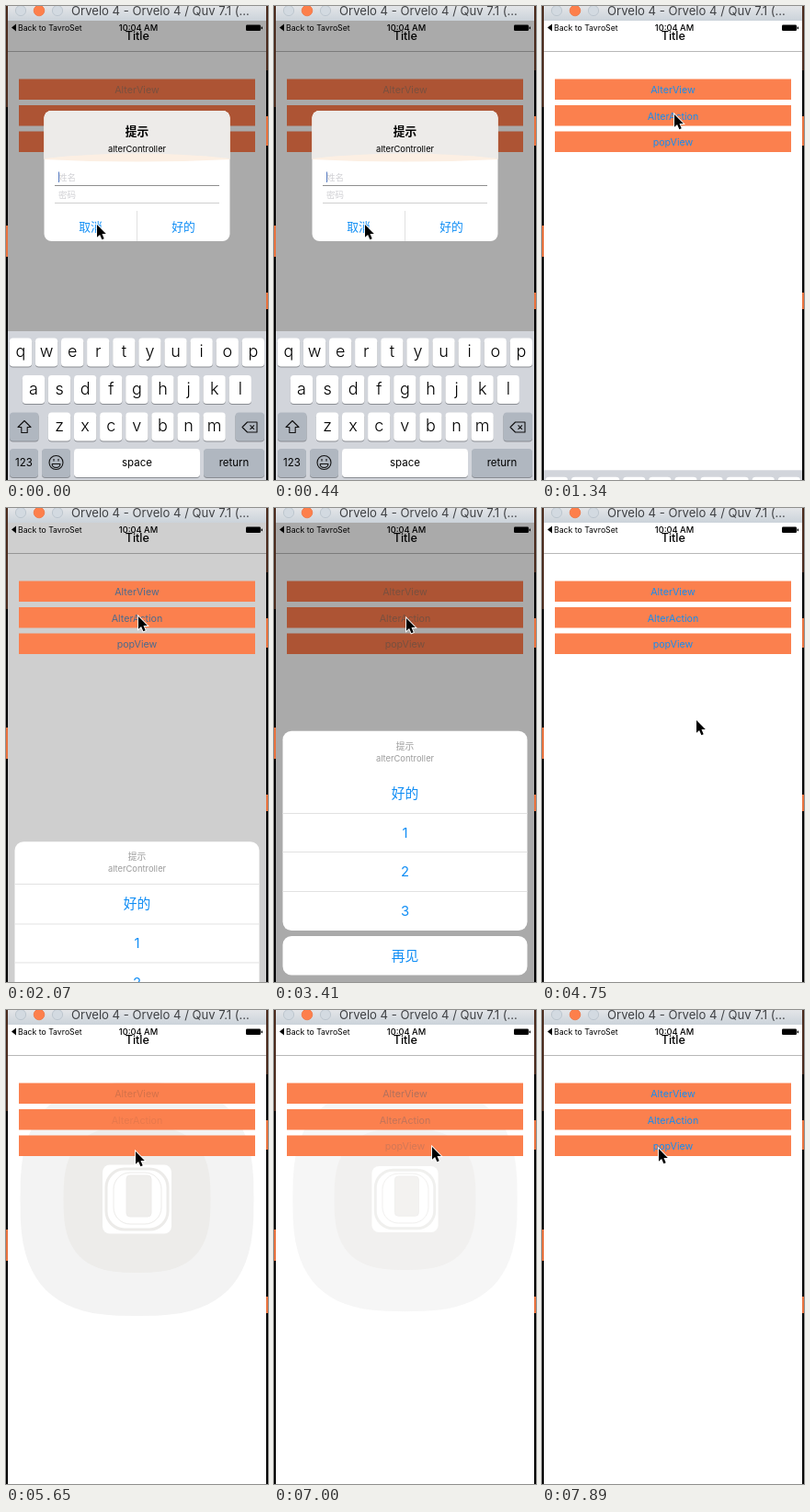
Animation, 285 px wide and 516 px high, one loop 8 s. Source, as an HTML page:

```html
<!DOCTYPE html>
<html lang="en">
<head>
<meta charset="utf-8">
<style>
  html, body { margin: 0; width: 100%; height: 100%; overflow: hidden; background: #000; }
  svg { display: block; width: 285px; height: 516px; }
  text { font-family: Inter, "Noto Sans CJK SC", "Noto Sans CJK", sans-serif; text-anchor: middle; }
  .start { text-anchor: start; }
  .blue { fill: #0f8df5; }
  .hint { fill: #cfcfd3; font-size: 9.5px; }
  .medium { font-weight: 500; }
  .bold { font-weight: 600; }
</style>
</head>
<body>
<svg viewBox="0 0 285 516">
  <defs>
    <linearGradient id="bar" x2="0" y2="1">
      <stop stop-color="#e3e5e8"/><stop offset="1" stop-color="#cbd3da"/>
    </linearGradient>
    <clipPath id="card"><rect x="41.5" y="114" width="202" height="142" rx="8"/></clipPath>
  </defs>

  <!-- desktop edges and window bar -->
  <path d="M0 0h2v110h-2zM283 0h2v70h-2z" fill="#4a2a1c"/>
  <path d="M0 239h2v34h-2zM283 120h2v32h-2zM283 312h2v18h-2z" fill="#e9713c"/>
  <rect x="2" width="281" height="16" fill="url(#bar)"/>
  <g fill="#d3dae1" stroke="#b7c0c9" stroke-width=".8">
    <circle cx="16" cy="5" r="5.6"/><circle cx="56" cy="5" r="5.6"/>
    <circle cx="36" cy="5" r="5.8" fill="#fd7f4b" stroke="#ee7443"/>
  </g>
  <text class="start" x="71" y="10" font-size="13.1" fill="#3f4144">Orvelo 4 - Orvelo 4 / Quv 7.1 (...</text>

  <!-- app screen -->
  <rect x="2" y="16" width="281" height="500" fill="#fff"/>
  <rect id="dim" x="2" y="16" width="281" height="500"/>
  <path d="M2 49.5H283" stroke="#000" stroke-opacity=".28"/>
  <path d="M11 19.5V27.5L6 23.5Z"/>
  <text class="start" x="13" y="27" font-size="8.7">Back to TavroSet</text>
  <text class="medium" x="144" y="27" font-size="9.3">10:04 AM</text>
  <rect x="261" y="20.5" width="16" height="6.5" rx="1.2"/><rect x="277.6" y="22.4" width="1.4" height="2.8" rx=".6"/>
  <text class="medium" x="142.8" y="37" font-size="12.6">Title</text>

  <g id="popup">
    <path id="outer" fill="#f3f3f3"/>
    <path id="inner" fill="#edecea"/>
    <rect x="105" y="168.5" width="75" height="75" rx="8" fill="#fff"/>
    <g fill="none" stroke="#ecebe9">
      <rect x="109" y="173" width="67" height="66" rx="20" stroke-width="3"/>
      <rect x="117" y="177" width="52" height="56" rx="18"/>
      <rect x="131" y="180" width="27" height="45" rx="4" fill="#efeeec"/>
    </g>
  </g>
  <g id="buttons"></g>

  <g id="sheet">
    <rect x="9.5" y="242.7" width="266" height="217.3" rx="9.5" fill="#fff"/>
    <rect x="9.5" y="466" width="266" height="42.5" rx="9.5" fill="#fff"/>
    <path d="M9.5 332.5h266M9.5 374.5h266M9.5 417.5h266" stroke="#e2e2e2"/>
    <path id="headLine" d="M9.5 289h266" stroke="#e2e2e2"/>
    <g fill="#9c9c9c">
      <text class="medium" x="142.5" y="262.5" font-size="9.8">提示</text>
      <text x="142.5" y="276" font-size="9.4">alterController</text>
    </g>
    <g class="blue" font-size="14.8">
      <text x="142.5" y="316">好的</text>
      <text x="142.5" y="358.7">1</text><text x="142.5" y="401.3">2</text><text x="142.5" y="444">3</text>
      <text class="medium" x="142.5" y="492.5">再见</text>
    </g>
  </g>

  <g id="alert">
    <g clip-path="url(#card)">
      <rect x="41" y="114" width="203" height="142" fill="#fff"/>
      <path d="M41 114H244V167Q142 172 41 167Z" fill="#fcefe3"/>
      <path d="M41 114H244V166Q142 155 41 166Z" fill="#edebe9"/>
    </g>
    <text class="bold" x="142.5" y="141" font-size="12.7">提示</text>
    <text x="142.5" y="158.7" font-size="9.4">alterController</text>
    <text class="hint start" x="57" y="189.5">姓名</text>
    <text class="hint start" x="57" y="208.5">密码</text>
    <path d="M57.5 180.5V192" stroke="#5b7fc4"/>
    <path d="M53 195.5H232" stroke="#8e8e8e"/>
    <path d="M53 214.5H232" stroke="#cfcfcf"/>
    <path d="M142.5 223V256" stroke="#e0e0e0"/>
    <g class="blue" font-size="12.8">
      <text class="medium" x="92" y="244.8">取消</text><text x="193" y="244.8">好的</text>
    </g>
  </g>

  <g id="keyboard"><rect x="2" y="354" width="281" height="163" fill="#d2d5db"/></g>
  <path id="cursor" d="M1 1V14.8L4.1 12L6.4 17.3L8.7 16.3L6.5 11.1H10.8Z" stroke="#fff" stroke-width="1.8" paint-order="stroke"/>
</svg>
<script>
const $ = id => document.getElementById(id);
const add = (parent, tag, attrs, text = '') => {
  const el = document.createElementNS('http://www.w3.org/2000/svg', tag);
  for (const name in attrs) el.setAttribute(name, attrs[name]);
  el.textContent = text;
  return parent.appendChild(el);
};

// Buttons
const buttons = ['AlterView', 'AlterAction', 'popView'].map((name, i) => ({
  box: add($('buttons'), 'rect', {x: 14, y: 79.5 + i * 28.5, width: 257, height: 22.5}),
  label: add($('buttons'), 'text', {x: 142.5, y: 95 + i * 28.5, 'font-size': 10.7}, name),
  faded: [.3, .15, 0][i]
}));

// Keyboard
const keyboard = $('keyboard');
function key(x, y, width, text, size, fill = '#fff') {
  add(keyboard, 'rect', {x, y: y + 1, width, height: 31, rx: 3.8, fill: '#898c92'});
  add(keyboard, 'rect', {x, y, width, height: 31, rx: 3.8, fill});
  add(keyboard, 'text', {x: x + width / 2, y: y + 15 + size * .33, 'font-size': size,
    'font-weight': size > 15 ? 300 : 400}, text);
}
[['qwertyuiop', 3.8, 361.5], ['asdfghjkl', 17.8, 402], ['zxcvbnm', 45.9, 442.5]].forEach(([row, x, y]) =>
  [...row].forEach((letter, i) => key(x + i * 28.1, y, 24.3, letter, 18)));
const gray = '#b0b7c0';
key(4, 442.5, 31.5, '', 12, gray);
key(249.5, 442.5, 31.5, '', 12, gray);
key(4, 482, 31, '123', 11.5, gray);
key(39, 482, 31, '', 12, gray);
key(74, 482, 137, 'space', 11.5);
key(215, 482, 66, 'return', 11.5, gray);
const icon = d => add(keyboard, 'path', {d, fill: 'none', stroke: '#111', 'stroke-width': 1.1, 'stroke-linejoin': 'round'});
icon('M20 451.5L13 458.5H16.8V464.5H23.2V458.5H27Z');
icon('M257 458.5L262.5 453H273V464H262.5ZM265.5 456.3L270 460.8M270 456.3L265.5 460.8');
icon('M47 497a7.5 7.5 0 1 0 15 0a7.5 7.5 0 1 0-15 0M50 498.5H59Q58.5 502.5 54.5 502.5T50 498.5M52 493v2.5M57 493v2.5');

// Rounded halo around the popup
const squircle = radius => 'M' + Array.from({length: 72}, (_, i) => {
  const coord = v => Math.sign(v) * Math.abs(v) ** .72 * radius;
  const a = i * Math.PI / 36;
  return (142.5 + coord(Math.cos(a))).toFixed(1) + ' ' + (206 + coord(Math.sin(a))).toFixed(1);
}).join('L') + 'Z';
$('outer').setAttribute('d', squircle(127));
$('inner').setAttribute('d', squircle(80));

// The screen updates only at these moments: [first, last, count]
const steps = [[0, 0, 1], [150, 1190, 8], [1340, 2360, 8], [2510, 2510, 1], [3410, 4450, 8],
  [4600, 5200, 5], [5500, 5650, 2], [6550, 6700, 2], [7000, 7440, 4], [7740, 7890, 2]]
  .flatMap(([first, last, n]) => Array.from({length: n}, (_, i) =>
    Math.round((first + (last - first) * i / Math.max(1, n - 1)) / 10) * 10));

const path = [[0, 98, 237], [700, 98, 237], [1190, 138, 126], [1340, 143, 117], [2510, 143, 117],
  [3410, 143, 119], [3560, 144, 160], [4000, 154, 470], [4300, 155, 477], [4450, 160, 446],
  [4600, 166, 370], [4750, 167, 230], [4900, 152, 91], [5050, 130, 120], [5200, 140, 153],
  [6400, 140, 153], [6700, 171, 148], [7600, 171, 148], [7890, 126, 150], [8000, 126, 150]];
const popupTrack = [[0, 0], [5350, 0], [5650, 1], [6850, 1], [7440, 0], [8000, 0]];

function sample(track, t) {
  const i = track.findIndex(k => k[0] > t);
  const a = track[i - 1], b = track[i], f = (t - a[0]) / (b[0] - a[0]);
  return a.slice(1).map((v, j) => v + (b[j + 1] - v) * f);
}
// Critically damped spring: the part of the way still left
function rest(t, start) {
  const x = Math.max(0, t - start) * .0183;
  return (1 + x) * Math.exp(-x);
}
const mix = (a, b, f) => `rgb(${a.map((v, i) => Math.round(v + (b[i] - v) * f))})`;

function draw(time) {
  const t = steps.filter(s => s <= time).pop();
  const alert = t < 1340 ? rest(t, 560) : 0;
  const sheet = t < 3000 ? 1 - rest(t, 1967.5) : t < 4450 ? rest(t, 4169) : 0;
  const keys = t < 1490 ? rest(t, 1105) : 0;
  const shade = Math.max(alert, sheet);
  const [popup] = sample(popupTrack, t);
  const [x, y] = sample(path, t);

  $('dim').setAttribute('opacity', shade * .335);
  $('alert').setAttribute('opacity', alert);
  $('sheet').setAttribute('transform', `translate(0 ${273.3 * (1 - sheet)})`);
  $('headLine').setAttribute('opacity', sheet > .98 ? 0 : 1);
  keyboard.setAttribute('transform', `translate(0 ${163 * (1 - keys)})`);
  $('popup').setAttribute('opacity', popup);
  $('popup').setAttribute('transform', `translate(142.5 206) scale(${.85 + .15 * popup}) translate(-142.5 -206)`);
  $('cursor').setAttribute('transform', `translate(${x} ${y})`);
  for (const {box, label, faded} of buttons) {
    box.setAttribute('fill', shade > .6 ? '#ad5434' : '#fb804e');
    label.setAttribute('fill', mix([22, 140, 240], [121, 80, 63], Math.max(shade, popup)));
    label.setAttribute('opacity', 1 - (1 - faded) * popup);
  }
}

function frame() {
  draw(performance.now() % 8000);
  requestAnimationFrame(frame);
}
frame();
</script>
</body>
</html>
```
